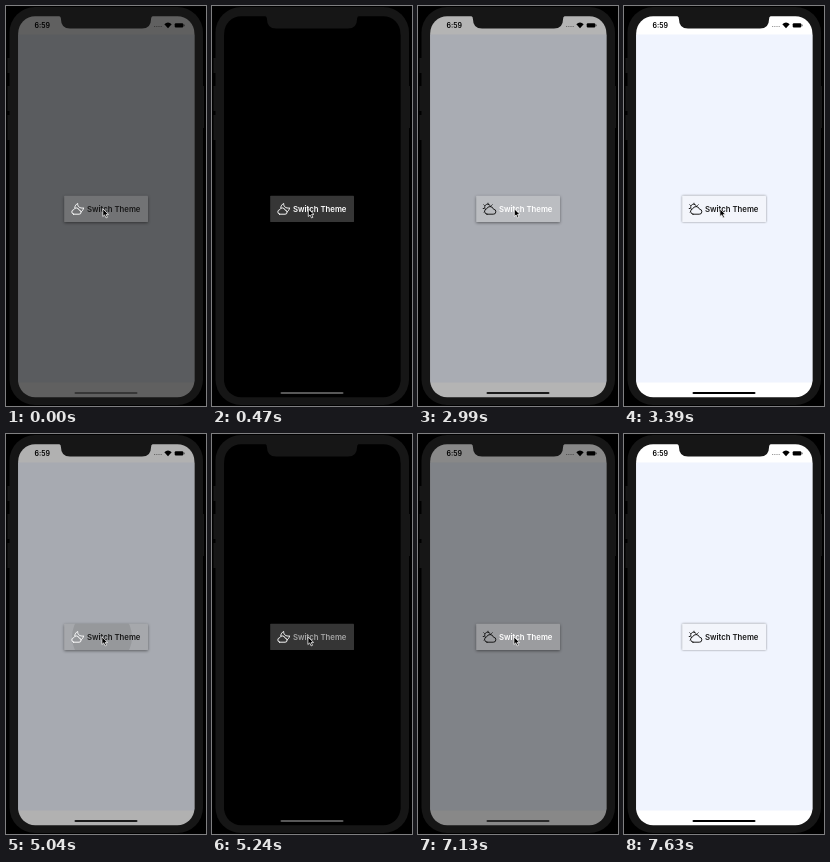
An HTML page that plays this animation: 200x400 px, repeating every 8.49 s.

```html
<!DOCTYPE html>
<html lang="en">
<head>
<meta charset="utf-8">
<title>Switch Theme</title>
<style>
  html, body { margin: 0; width: 100%; height: 100%; overflow: hidden; background: #000; }
  svg { display: block; width: 100vw; height: 100vh; }
  text { font-family: Inter, "Open Sans", sans-serif; font-weight: 600; }
  .line { fill: none; stroke-linecap: round; stroke-linejoin: round; }
</style>
</head>
<body>
<svg viewBox="0 0 200 400">
  <defs>
    <clipPath id="screenClip"><rect x="12.2" y="10.2" width="176.2" height="381" rx="17"/></clipPath>
    <clipPath id="buttonClip"><rect x="58.2" y="189.8" width="83.8" height="26.3"/></clipPath>
  </defs>

  <g fill="#161616">
    <path d="M1.5 52h4v15h-4zM1.5 80h4v25h-4zM1.5 109h4v25h-4zM195 80h3v42h-3z"/>
    <rect x="3.5" y="1" width="193.5" height="398" rx="25.5"/>
  </g>
  <g clip-path="url(#screenClip)">
    <rect id="safeArea" x="12" y="10" width="177" height="382"/>
    <rect id="page" x="12" y="28.5" width="177" height="348"/>
    <text x="28.5" y="22" font-size="7">6:59</text>
    <g fill="#000">
      <path d="M148 20h1.2v1h-1.2zM150.2 20h1.2v1h-1.2zM152.4 20h1.2v1h-1.2zM154.6 20h1.2v1h-1.2z" opacity=".4"/>
      <path d="M158.3 18.2q3.7-3.2 7.4 0L162 22.3z"/>
      <rect x="168.7" y="17.2" width="8.6" height="4.4" rx="1.1"/>
      <rect x="177.7" y="18.6" width=".7" height="1.6"/>
    </g>
    <rect id="homeBar" x="68.5" y="385.9" width="63" height="2.2" rx="1.1"/>
  </g>
  <path fill="#161616" d="M52 9.5q3 .5 3 4 0 9 9 9h72q9 0 9-9 0-3.5 3-4z"/>

  <rect id="button" x="58.2" y="189.8" width="83.8" height="26.3" rx=".7"/>
  <g clip-path="url(#buttonClip)">
    <rect id="highlight" x="58" y="189" width="84" height="28"/>
    <circle id="ripple" cx="96" cy="203"/>
  </g>
  <g id="sun" class="line" stroke="#111" stroke-width=".95">
    <path d="M69 208.2h6.2a2.5 2.5 0 0 0 .3-5 3.6 3.6 0 0 0-6.8-.4 2.75 2.75 0 0 0 .3 5.4z"/>
    <path d="M67.2 203.2a3.1 3.1 0 1 1 5.5-2.5M70 197.2v.5M65.8 198.8l.6.6M74.2 198.8l-.6.6M65.2 202.5h.6M66 206l.4-.4"/>
  </g>
  <g id="moon" class="line" stroke="#fff" stroke-width=".95">
    <path d="M67.6 208.2h5.4a2 2 0 0 0 .2-4 2.9 2.9 0 0 0-5.5-.5 2.3 2.3 0 0 0-.1 4.5z"/>
    <path d="M68.8 201.6c.1-1.8 1.2-3.3 2.9-4.1-.3 3 2.2 5.2 5.9 4.4-.4 1.9-1.2 3.2-2.7 4.1"/>
  </g>
  <text id="label" x="81" y="206" font-size="7.75">Switch Theme</text>

  <g id="ring" class="line" stroke="#888">
    <circle cx="95.8" cy="203" r="13" stroke-width=".8"/>
    <circle cx="95.8" cy="203" r="11.2" stroke-width=".5"/>
  </g>
  <path id="cursor" d="M0 0v7.7l1.8-1.6 1.4 3 1.4-.6-1.3-2.9h2.4z"
    fill="#000" stroke="#fff" stroke-width=".75" stroke-linejoin="round"/>
</svg>

<script>
const LOOP = 8490, FADE = 200, TEXT_FADE = 100;
const taps = [
  { press: -450, flip: -124, dark: true },
  { press: 2590, flip: 2850, dark: false },
  { press: 4580, flip: 4980, dark: true },
  { press: 6690, flip: 7024, dark: false },
];

const el = id => document.getElementById(id);
const set = (id, attrs) => {
  for (const name in attrs) el(id).setAttribute(name, attrs[name]);
};
const clamp = x => Math.min(1, Math.max(0, x));
const progress = (t, start, length) => clamp((t - start) / length);
const mix = (a, b, k) => `rgb(${a.map((v, i) => Math.round(v + (b[i] - v) * k))})`;
const gray = v => [v, v, v];

function cursorAt(t) {
  const exit = progress(t, 7330, 300) ** 2;
  const x = t < 470 ? 96.8 : t < 3390 ? 96.3 : 95.9;
  return { x: x + 8 * exit, y: 202.8 - 205 * exit, visible: t < 7630 };
}

function draw(t) {
  const { press, flip, dark } = taps.filter(tap => tap.press <= t).pop();
  const theme = progress(t, flip, FADE);
  // The label only starts to fade once the theme colours have settled.
  const label = progress(t, flip + FADE, TEXT_FADE);
  const light = dark ? 1 - theme : theme;
  const labelLight = dark ? 1 - label : label;
  const isDark = t >= flip ? dark : !dark;

  set("safeArea", { fill: mix(gray(0), gray(255), light) });
  set("page", { fill: mix(gray(0), [240, 244, 254], light) });
  set("button", { fill: mix(gray(54), [243, 245, 251], light) });
  set("homeBar", { fill: mix(gray(88), gray(0), light) });
  set("label", { fill: mix(gray(255), gray(24), labelLight) });
  set("sun", { opacity: isDark ? 0 : 1 });
  set("moon", { opacity: isDark ? 1 : 0 });

  const raised = t >= press + 170 && t < flip + 250;
  el("button").style.filter =
    `drop-shadow(0 ${raised ? 1.3 : 0.8}px ${raised ? 1.4 : 0.8}px rgba(0,0,0,.45))`;

  const splash = dark && t >= flip - 90;
  set("highlight", { opacity: splash ? 0.1 * (1 - progress(t, flip + 100, 200)) : 0 });
  set("ripple", {
    r: 8 + 22 * progress(t, flip - 90, 150),
    opacity: splash ? 0.1 * (1 - progress(t, flip + 60, 60)) : 0,
  });

  set("ring", { opacity: t < flip - 90 ? 0.9 : 0 });

  const { x, y, visible } = cursorAt(t);
  set("cursor", { transform: `translate(${x} ${y})`, opacity: visible ? 1 : 0 });
}

const begin = performance.now();
function tick() {
  draw((performance.now() - begin) % LOOP);
  requestAnimationFrame(tick);
}
tick();
</script>
</body>
</html>
```
